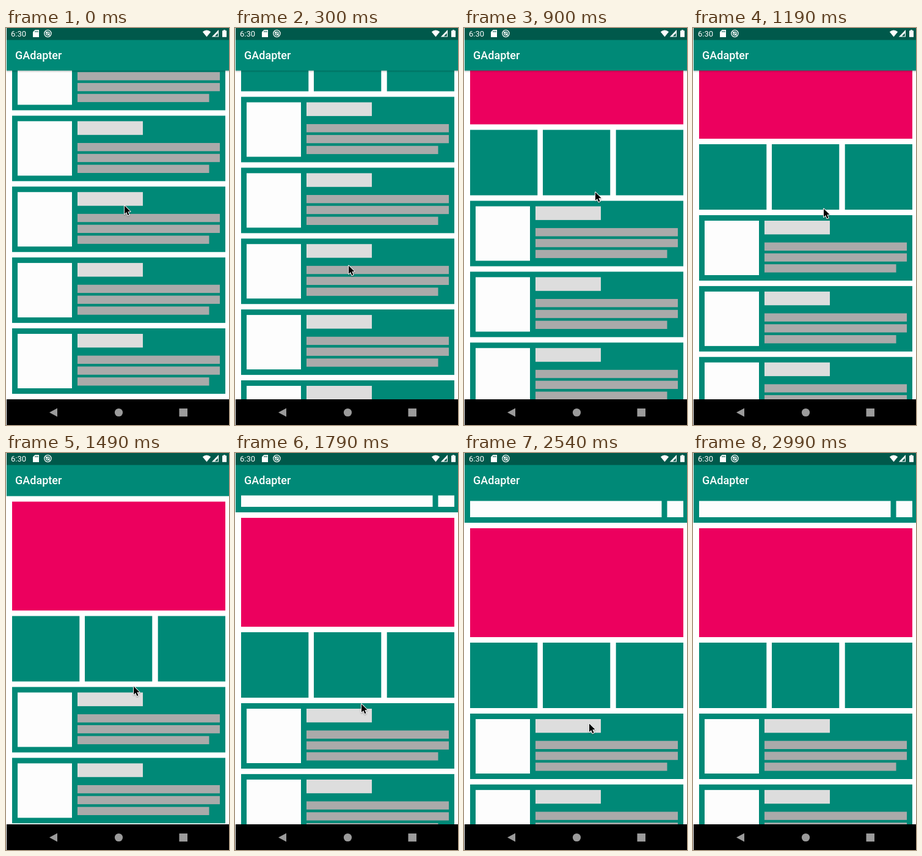
Write an HTML page with a canvas that moves like this. It is 365 by 649 pixels and loops after 3590 ms.

```html
<!DOCTYPE html>
<html lang="en">
<head>
<meta charset="utf-8">
<title>GAdapter</title>
<style>
html, body { margin: 0; width: 100%; height: 100%; overflow: hidden; background: #fff; }
canvas { display: block; width: 365px; height: 649px; }
</style>
</head>
<body>
<canvas id="stage" width="365" height="649"></canvas>
<script>
const ctx = document.getElementById('stage').getContext('2d');
const LOOP = 3590;
const TEAL = '#008977', DARK = '#00594b', PINK = '#ec005e';
const PAPER = '#fdfdfd', TITLE = '#dddddd', LINE = '#aaaaaa', NAV = '#9b9b9b';

// One entry per step: list offset, pointer x, pointer y.
const steps = [
  [-398.5, 193, 289], [-356, 190, 338], [-313.5, 185, 387], [-268, 179, 439],
  [-223.5, 172, 491], [-159, 172, 540], [-143.5, 214, 267], [-142, 214, 270],
  [-120, 213, 294], [-82, 211, 337], [-43.5, 208, 380], [-28, 207, 397],
  [-17, 206, 409], [-8, 205, 419], [0, 204, 428], [0, 203, 439],
  [0, 202, 440], [0, 204, 441], [0, 281, 531], [0, 325, 608], [0]
];

function box(color, x1, y1, x2, y2) {
  ctx.fillStyle = color;
  ctx.fillRect(x1, y1, x2 - x1, y2 - y1);
}

function shape(color, ...p) {
  ctx.beginPath();
  for (let i = 0; i < p.length; i += 2) ctx.lineTo(p[i], p[i + 1]);
  ctx.closePath();
  ctx.fillStyle = color;
  ctx.fill();
}

function disc(color, x, y, r) {
  ctx.beginPath();
  ctx.arc(x, y, r, 0, 2 * Math.PI);
  ctx.fillStyle = color;
  ctx.fill();
}

function ring(x, y, r, width) {
  ctx.beginPath();
  ctx.arc(x, y, r, 0, 2 * Math.PI);
  ctx.lineWidth = width;
  ctx.strokeStyle = '#fff';
  ctx.stroke();
}

function label(text, x, y, font) {
  ctx.fillStyle = '#fff';
  ctx.font = font + ' Roboto, sans-serif';
  ctx.fillText(text, x, y);
}

function card(y) {
  box(TEAL, 10, y, 359, y + 107);
  box(PAPER, 19, y + 9, 108, y + 98);
  box(TITLE, 117, y + 9, 224, y + 31.4);
  [350, 350, 332.5].forEach((right, i) => {
    const top = y + 44.6 + i * 17.8;
    box(LINE, 117, top, right, top + 13.4);
  });
}

function list(s) {
  box(PINK, 10, 123 + s, 359, 301 + s);
  [10, 129, 248.7].forEach(x => box(TEAL, x, 310 + s, x + 110.3, 417 + s));
  for (let i = 0; i < 5; i++) card(426 + s + i * 115.87);
}

function header(s) {
  const bottom = Math.max(69.4, 114 + s);
  box(TEAL, 1, 19, 365, bottom);
  if (s > -45) {
    box(PAPER, 10, 78.4 + s, 323.5, 105 + s);
    box(PAPER, 332.5, 78.4 + s, 359, 105 + s);
  } else {
    const fade = ctx.createLinearGradient(0, 69.4, 0, 73);
    fade.addColorStop(0, 'rgba(0,0,0,.22)');
    fade.addColorStop(1, 'rgba(0,0,0,0)');
    box(fade, 1, 69.4, 365, 73);
  }
  box(TEAL, 1, 19, 365, 69.4);
  label('GAdapter', 15, 51, '500 18px');
}

function statusBar() {
  box(DARK, 1, 0, 365, 19.6);
  label('6:30', 8, 14, '13px');

  // Memory card
  shape('#fff', 47.5, 3, 54, 3, 54, 15, 44, 15, 44, 6.5);
  for (let x = 47.4; x < 53; x += 2) box(DARK, x, 4.6, x + 1, 7);

  ring(68.4, 9, 5.6, 1.3);
  ring(68.4, 9, 2.7, 1.2);
  ctx.beginPath();
  ctx.moveTo(65.2, 6);
  ctx.lineTo(71.6, 12.2);
  ctx.stroke();

  // Wi-Fi
  ctx.beginPath();
  ctx.moveTo(328.5, 14.6);
  ctx.lineTo(321.8, 6.2);
  ctx.quadraticCurveTo(328.5, 0.8, 335.2, 6.2);
  ctx.fillStyle = '#fff';
  ctx.fill();

  // Signal
  shape('#fff', 348, 3, 348, 14.5, 336.8, 14.5);
  shape(DARK, 346.8, 8.2, 346.8, 13.4, 341.8, 13.4);

  // Battery
  box('#fff', 354, 4.3, 361, 14.8);
  box('#fff', 356, 3, 359, 4.5);
}

function navBar() {
  box('#000', 1, 607, 365, 649);
  shape(NAV, 71, 628.5, 84, 621.5, 84, 635.5);
  disc(NAV, 184.5, 628.5, 6.6);
  box(NAV, 283.5, 622, 297, 635.2);
}

function pointer(x, y) {
  ctx.save();
  ctx.translate(x + 1, y + 1.5);
  ctx.beginPath();
  const p = [0, 0, 0, 13.5, 3.1, 10.6, 5.4, 15.8, 7.6, 14.8, 5.3, 9.8, 9.6, 9.6];
  for (let i = 0; i < p.length; i += 2) ctx.lineTo(p[i], p[i + 1]);
  ctx.closePath();
  ctx.lineWidth = 2;
  ctx.lineJoin = 'round';
  ctx.strokeStyle = '#fff';
  ctx.shadowColor = 'rgba(0,0,0,.35)';
  ctx.shadowBlur = 2;
  ctx.shadowOffsetY = 1;
  ctx.stroke();
  ctx.shadowColor = 'transparent';
  ctx.fillStyle = '#000';
  ctx.fill();
  ctx.restore();
}

function stepAt(t) {
  const shift = t < 1190 ? 0 : 10;
  return Math.min(steps.length - 1, Math.floor((t + shift) / 150));
}

function draw(t) {
  const [s, x, y] = steps[stepAt(t)];
  box('#fff', 0, 0, 365, 649);
  list(s);
  header(s);
  statusBar();
  navBar();
  if (x !== undefined) pointer(x, y);
}

const start = performance.now();
function tick() {
  draw((performance.now() - start) % LOOP);
  requestAnimationFrame(tick);
}
tick();
</script>
</body>
</html>
```
